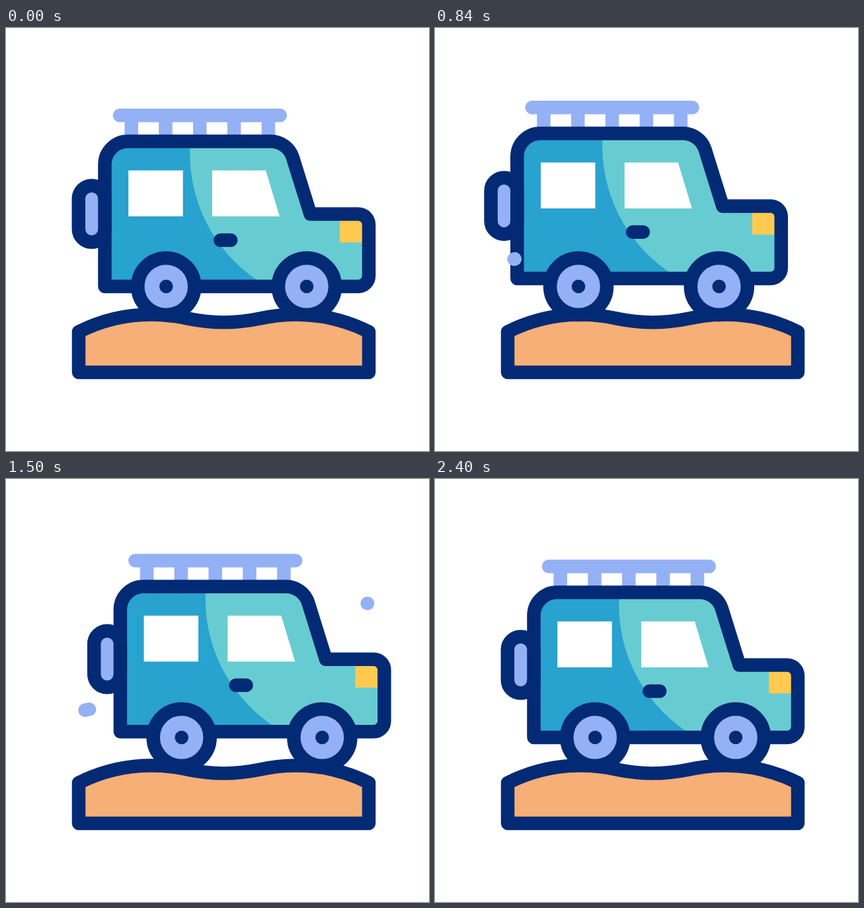
Animation, 640 px wide and 640 px high, one loop 2.42 s. Source, as an HTML page:

```html
<!DOCTYPE html>
<html lang="en">
<head>
<meta charset="utf-8">
<title>Off-road car</title>
<style>
  html, body { margin: 0; width: 100%; height: 100%; overflow: hidden; background: #fff; }
  svg { display: block; width: 100vw; height: 100vh; }
  .line { stroke: #032a75; stroke-width: 20.5; stroke-linecap: round; stroke-linejoin: round; }
  .soft { stroke: #93b1f4; stroke-width: 20.5; stroke-linecap: round; fill: none; }
</style>
</head>
<body>
<svg viewBox="0 0 640 640">
  <defs>
    <path id="shell" d="M149.5 391V206.500A35 35 0 0 1 184.500 171.500H400.400A35 35 0 0 1 433.900 196.100L460.500 281.500H533A16 16 0 0 1 549 297.500V375A16 16 0 0 1 533 391Z"/>
    <clipPath id="inside"><use href="#shell"/></clipPath>
    <path id="gust" d="M547 188.200C510 191 474 176 437 184.500" pathLength="1"/>
    <g id="wheel">
      <circle class="line" r="43" fill="#93b1f4"/>
      <circle r="10.300" fill="#032a75"/>
    </g>
  </defs>

  <path class="line" fill="#f6af76" d="M110 459.600C143 443 180 433.400 220 433.400C239 433.400 258 435.700 276 439.800C311 447.100 348 447.100 383 439.800C401 435.700 419 433.400 438.500 433.400C479 433.400 516 443 549 459.600V521H110Z"/>

  <g id="body">
    <path class="soft" d="M172 132.300H414.800"/>
    <path class="soft" style="stroke-linecap:butt" d="M189.700 132V168M241.500 132V168M293.300 132V168M345.100 132V168M397 132V168"/>
    <g clip-path="url(#inside)">
      <path fill="#67ccd1" d="M140 160H560V400H140Z"/>
      <path fill="#28a2ce" d="M140 160H280L278.500 181A231 231 0 0 0 379 381L400 400H140Z"/>
      <path fill="#ffca4f" d="M505 280H545V324.500H505Z"/>
    </g>
    <path fill="#fff" d="M185.200 215.500H267.700V285H185.200ZM312 215.500H393L414 285H312Z"/>
    <path class="line" d="M324.300 320.900H340.200"/>
    <use href="#shell" class="line" fill="none"/>
    <rect class="line" fill="#93b1f4" x="109.800" y="238.500" width="39.700" height="85.500" rx="19.850"/>
  </g>

  <g id="wheels">
    <use href="#wheel" x="242.300" y="391"/>
    <use href="#wheel" x="455" y="391"/>
  </g>

  <use id="high" class="soft" href="#gust"/>
  <use id="low" class="soft" href="#gust" x="-317.500" y="165.200"/>
</svg>
<script>
  const LOOP = 2420, STEP = 20;
  const DRIFT = [0, -25.6, 25.6, 0];                       // every 800 ms
  const BOUNCE = [0, 12.8, -12.8, 12.8, -12.8, 12.8, 0];   // every 400 ms
  const GUSTS = [[0, 600], [880, 400], [1480, 600]];       // start, travel time
  const TAIL_LAG = 80, LOW_LAG = 200;

  const $ = id => document.getElementById(id);
  const body = $('body'), wheels = $('wheels'), high = $('high'), low = $('low');

  function ease(p) {
    p = Math.min(1, Math.max(0, p));
    return p * p * (3 - 2 * p);
  }

  function track(keys, span, t) {
    const i = Math.min(keys.length - 2, Math.floor(t / span));
    return keys[i] + (keys[i + 1] - keys[i]) * ease(t / span - i);
  }

  function blow(el, t) {
    let tail = 0, len = 0;
    for (const [start, time] of GUSTS) {
      const head = ease((t - start) / time);
      const end = ease((t - start - TAIL_LAG) / time);
      if (head - end > 1e-4) {
        tail = end;
        len = head - end;
      }
    }
    el.style.display = len ? '' : 'none';
    el.style.strokeDasharray = `${len} 2`;
    el.style.strokeDashoffset = -tail;
  }

  function draw(t) {
    const x = track(DRIFT, 800, t), y = track(BOUNCE, 400, t);
    body.setAttribute('transform', `translate(${x} ${y})`);
    wheels.setAttribute('transform', `translate(${x} 0)`);
    blow(high, t);
    blow(low, t - LOW_LAG);
  }

  function tick(now) {
    draw(Math.floor(now % LOOP / STEP) * STEP);
    requestAnimationFrame(tick);
  }

  draw(0);
  requestAnimationFrame(tick);
</script>
</body>
</html>
```
